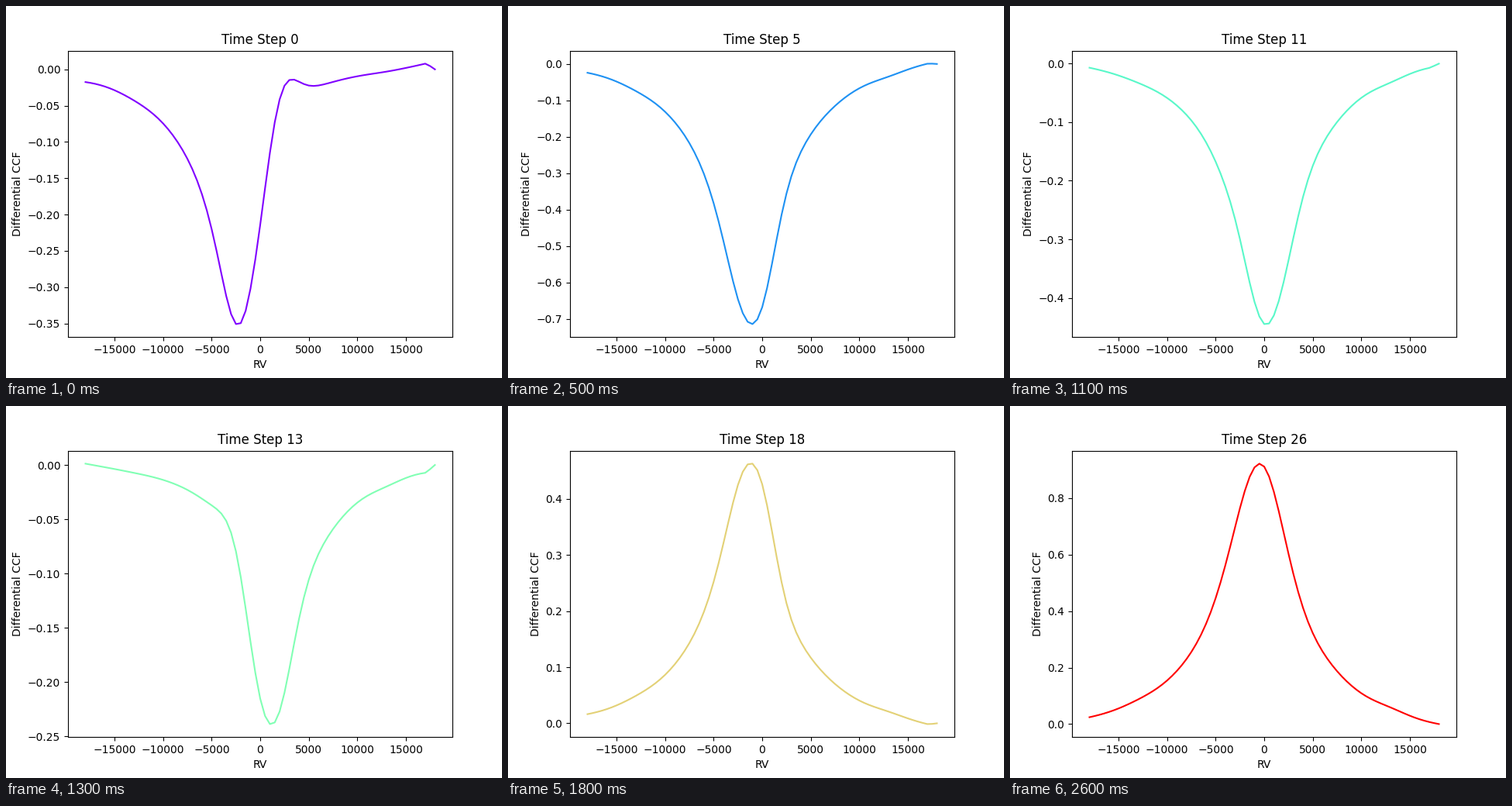
A matplotlib script for the animation above (2700 ms loop, 640 by 480 pixels).

```python
import matplotlib.pyplot as plt
import numpy as np
from matplotlib.animation import FuncAnimation

FRAMES = 27
INTERVAL = 100

# Key steps and the strength of each part of the signal there.
KEYS = [0, 5, 9, 13, 18, 22, 26]
LEVEL = [-.288, -.7325, -.654, -.202, .4675, .825, 1]
SKEW = [.194, .1175, -.022, -.112, -.0925, -.038, 0]
BUMP = [.053, 0, -.024, -.034, 0, .02, 0]


def ease(values, step):
    """Smooth cubic path through the key values."""
    slopes = np.gradient(values, KEYS, edge_order=2)
    i = min(np.searchsorted(KEYS, step, side="right"), len(KEYS) - 1) - 1
    span = KEYS[i + 1] - KEYS[i]
    s = (step - KEYS[i]) / span
    blend = s * s * (3 - 2 * s)
    bend = s * (1 - s) * span * (slopes[i] * (1 - s) - slopes[i + 1] * s)
    return values[i] + (values[i + 1] - values[i]) * blend + bend


def ring(x, radius):
    """Two equal humps at +-radius with height 1."""
    r = (x / radius) ** 2
    return r * np.exp(1 - r)


def wing(v, width, floor, dent, radius, shoulder):
    """One side of the line profile: a Lorentzian with a dented flank."""
    x = v + .45
    line = (.922 + floor) / (1 + (x / width) ** 2) - floor
    hump = shoulder * np.exp(-((np.abs(v) - 13) / 2.5) ** 2)
    return line - dent * ring(x, radius) + hump


velocity = np.arange(-18000, 18001, 500)
v = velocity / 1000
profile = np.where(v < -.45,
                   wing(v, 4.9, .046, .028, 4.3, .005),
                   wing(v, 4.77, .062, .054, 4.0, .011))
profile -= profile[-1]

# A rounded step between the two flanks, a central bump, and lifted ends.
flank = (np.tanh(v / 2) + .04 * v**3 * np.exp(-(v / 2.55) ** 2)
         + .13 * ring(v, 2.6))
centre = np.exp(-(v / 2.2) ** 2)
u = v / 17
ends = .011 * u**4 * (3 * u + 1) * np.clip(18 - v, 0, 1)


def signal(step):
    level, skew, bump = (ease(k, step) for k in (LEVEL, SKEW, BUMP))
    return profile * (level + skew * flank + bump * centre) + skew * ends


colors = plt.cm.rainbow(np.linspace(0, 1, FRAMES))
fig, ax = plt.subplots(figsize=(6.4, 4.8), dpi=100)


def draw(step):
    ax.clear()
    ax.plot(velocity, signal(step), color=colors[step])
    ax.set_title(f"Time Step {step}")
    ax.set_xlabel("RV")
    ax.set_ylabel("Differential CCF")


anim = FuncAnimation(fig, draw, frames=FRAMES, interval=INTERVAL,
                     init_func=lambda: draw(0), repeat=True, repeat_delay=0)
plt.show()
```
